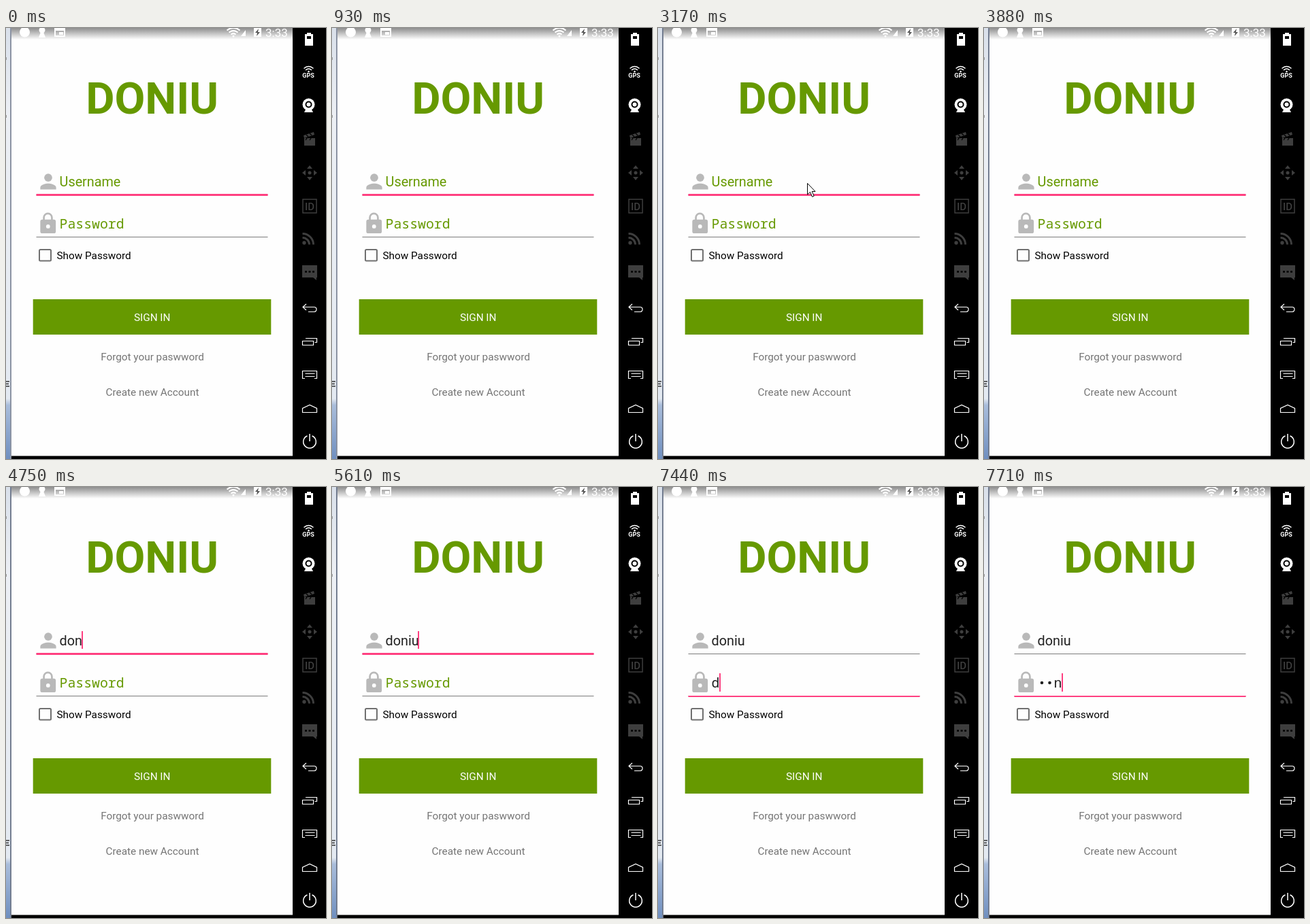
An HTML page for the animation above (7990 ms loop, 470x634 px).

```html
<!DOCTYPE html>
<html lang="en">
<head>
<meta charset="utf-8">
<title>Sign in</title>
<style>
  html, body { margin: 0; width: 100%; height: 100%; overflow: hidden; background: #fefefe; }
  svg { display: block; width: 470px; height: 634px; }
  text { font: 15.3px Roboto, sans-serif; white-space: pre; }
  .mid { text-anchor: middle; }
  .title { font-size: 65px; font-weight: 700; fill: #690; }
  .entry { font-size: 19.8px; fill: #212121; }
  .mono { font-family: "Noto Sans Mono", monospace; }
  .hint { fill: #690; }
  .soft { fill: #757575; }
  .pink { fill: #ff4081; }
  .line { fill: none; stroke: #fff; stroke-width: 1.2; }
  .dim { color: #3e3e3e; }
  .dim .line { stroke: currentColor; }

  /* every change is a hard cut on one shared clock */
  .a { animation: 7990ms step-end infinite; }
  .edge { animation-name: edge; }
  .name-hint { animation-name: name-hint; }
  .pass-hint { animation-name: pass-hint; }
  .name-focus { animation-name: name-focus; }
  .pass-focus { animation-name: pass-focus; }
  .n1 { animation-name: n1; }
  .n2 { animation-name: n2; }
  .n3 { animation-name: n3; }
  .n4 { animation-name: n4; }
  .n5 { animation-name: n5; }
  .p1 { animation-name: p1; }
  .p2 { animation-name: p2; }
  .p3 { animation-name: p3; }
  .dot1 { animation-name: dot1; }
  .name-caret { animation-name: name-blink, name-move; }
  .pass-caret { animation-name: pass-blink, pass-move; }
  .pointer { animation-name: pointer-show, pointer-move; }

  @keyframes edge { 0% { fill: #8b93a3 } 39.674%, 100% { fill: #737d90 } }
  @keyframes name-hint { 0% { visibility: visible } 54.067%, 100% { visibility: hidden } }
  @keyframes pass-hint { 0% { visibility: visible } 93.116%, 100% { visibility: hidden } }
  @keyframes name-focus { 0% { visibility: visible } 82.352%, 100% { visibility: hidden } }
  @keyframes pass-focus { 0% { visibility: hidden } 82.352%, 100% { visibility: visible } }

  @keyframes n1 { 0% { visibility: hidden } 54.067%, 100% { visibility: visible } }
  @keyframes n2 { 0% { visibility: hidden } 57.571%, 100% { visibility: visible } }
  @keyframes n3 { 0% { visibility: hidden } 59.449%, 100% { visibility: visible } }
  @keyframes n4 { 0% { visibility: hidden } 68.46%, 100% { visibility: visible } }
  @keyframes n5 { 0% { visibility: hidden } 70.212%, 100% { visibility: visible } }

  @keyframes p1 { 0%, 94.993%, 100% { visibility: hidden } 93.116% { visibility: visible } }
  @keyframes p2 { 0%, 96.495%, 100% { visibility: hidden } 94.993% { visibility: visible } }
  @keyframes p3 { 0% { visibility: hidden } 96.495%, 100% { visibility: visible } }
  @keyframes dot1 { 0% { visibility: hidden } 94.993%, 100% { visibility: visible } }

  @keyframes name-blink {
    0%, 11.639%, 24.405%, 35.919%, 48.56%, 66.833%, 77.221%, 100% { visibility: hidden }
    5.006%, 17.521%, 29.536%, 41.551%, 54.067%, 68.46% { visibility: visible }
  }
  @keyframes name-move {
    0% { transform: none }
    54.067% { transform: translateX(10px) }
    57.571% { transform: translateX(21px) }
    59.449% { transform: translateX(32px) }
    68.46% { transform: translateX(37px) }
    70.212%, 100% { transform: translateX(47px) }
  }
  @keyframes pass-blink {
    0%, 89.611% { visibility: hidden }
    82.352%, 93.116%, 100% { visibility: visible }
  }
  @keyframes pass-move {
    0% { transform: none }
    93.116% { transform: translateX(11px) }
    94.993% { transform: translateX(23px) }
    96.495%, 100% { transform: translateX(35px) }
  }
  @keyframes pointer-show {
    0%, 45.056%, 100% { visibility: hidden }
    31.289% { visibility: visible }
  }
  @keyframes pointer-move {
    0% { transform: translate(271px, 260px) }
    32.79% { transform: translate(243px, 248px) }
    34.418% { transform: translate(227px, 235px) }
    35.919%, 100% { transform: translate(219px, 228px) }
  }
</style>
</head>
<body>
<svg viewBox="0 0 470 634">
  <defs>
    <linearGradient id="bar" x2="0" y2="1">
      <stop offset="0" stop-color="#8e8e8e"/>
      <stop offset="1" stop-color="#fefefe"/>
    </linearGradient>
    <linearGradient id="desk" x2="0" y2="1">
      <stop offset="0" stop-color="#d9e0ea"/>
      <stop offset=".2" stop-color="#eceff4"/>
      <stop offset=".86" stop-color="#e3e9f1"/>
      <stop offset=".875" stop-color="#a9bddb"/>
      <stop offset="1" stop-color="#6f8fc0"/>
    </linearGradient>
  </defs>

  <!-- desktop strip and window -->
  <rect width="470" height="634" fill="#fefefe"/>
  <rect width="6" height="634" fill="url(#desk)"/>
  <rect class="a edge" x="6" width="2" height="634"/>
  <path d="M0 520h5M0 523.500h4M0 527h5" stroke="#333" stroke-width="1.500"/>
  <path d="M0 45h1M0 130h1" stroke="#999" stroke-width="4"/>
  <rect x="8" y="629.500" width="414" height="5"/>
  <rect x="421" width="49" height="634"/>

  <!-- status bar -->
  <rect x="8" width="413" height="17" fill="url(#bar)"/>
  <g fill="#fff">
    <circle cx="27.500" cy="6" r="7.500"/>
    <circle cx="53" cy="3" r="4.500"/>
    <path d="M51 6h4l3 8H48z"/>
    <path fill-rule="evenodd" d="M71 0h16v13H71zM73 4v7h12V4zM78 6h6v4h-6z"/>
    <path class="line" style="stroke-width:2.200" d="M324.500 3.500Q334-4 343.500 3.500M327.500 6.500Q334 1.500 340.500 6.500M330.500 9.500Q334 6.500 337.500 9.500"/>
    <circle cx="334" cy="12" r="1.500"/>
    <path d="M352 12V3l-7 9z"/>
    <path d="M364 0h11v13h-11z"/>
    <path d="M371 1l-5 6h3l-1 5 5-6h-3z" fill="#555"/>
    <text x="381" y="12.500" style="font-size:17px">3:33</text>
  </g>

  <!-- form -->
  <text class="title mid" x="214.600" y="126">DONIU</text>

  <g fill="#b9b9b9" transform="translate(1.850 7.700) scale(.97)">
    <circle cx="62" cy="219" r="6"/>
    <path d="M62 228c-4 0-12 2-12 6v3h24v-3c0-4-8-6-12-6z"/>
    <path fill-rule="evenodd" d="M70.500 282.500H69v-3a7.500 7.500 0 0 0-15 0v3h-1a3 3 0 0 0-3 3v15a3 3 0 0 0 3 3h17.500a3 3 0 0 0 3-3v-15a3 3 0 0 0-3-3zM56.800 282.500v-3a4.700 4.700 0 0 1 9.400 0v3z"/>
    <circle cx="61.800" cy="293" r="3" fill="#fefefe"/>
  </g>

  <rect x="44.500" y="245" width="340" height="1" fill="#7c7c7c"/>
  <rect class="a name-focus pink" x="44.500" y="244" width="340" height="3"/>
  <rect x="44.500" y="307" width="340" height="1" fill="#7c7c7c"/>
  <rect class="a pass-focus pink" x="44.500" y="307" width="340" height="2"/>

  <text class="a entry hint name-hint" x="78.600" y="233">Username</text>
  <text class="entry" x="78.600" y="233"><tspan class="a n1">d</tspan><tspan class="a n2">o</tspan><tspan class="a n3">n</tspan><tspan class="a n4">i</tspan><tspan class="a n5">u</tspan></text>
  <rect class="a name-caret pink" x="79" y="212" width="2" height="26"/>

  <text class="a entry mono hint pass-hint" x="78.600" y="295">Password</text>
  <text class="a entry mono p1" x="78.600" y="295">d</text>
  <text class="a entry mono p2" x="90.500" y="295">o</text>
  <text class="a entry mono p3" x="102.400" y="295">n</text>
  <circle class="a dot1" cx="85" cy="288" r="2.300" fill="#212121"/>
  <circle class="a p3" cx="96.500" cy="288" r="2.300" fill="#212121"/>
  <rect class="a pass-caret pink" x="79" y="274" width="2" height="27"/>

  <rect x="49" y="326" width="17" height="16.500" rx="1.500" fill="none" stroke="#707070" stroke-width="2"/>
  <text x="74.500" y="340">Show Password</text>

  <rect x="39.700" y="399" width="349.600" height="52" fill="#690"/>
  <text class="mid" x="214.700" y="431" fill="#fff">SIGN IN</text>
  <text class="mid soft" x="215" y="489">Forgot your paswword</text>
  <text class="mid soft" x="215" y="541">Create new Account</text>

  <!-- side toolbar -->
  <g fill="#fff">
    <path fill-rule="evenodd" d="M442 7h6v2h3v17h-12V9h3zM442 12v4h6v-4z"/>
    <path class="line" style="stroke-width:1.500" d="M437.500 59.500q7-6 14 0M440 62q4.500-4 9 0"/>
    <circle cx="444.500" cy="64" r="1.300"/>
    <text class="mid" x="444" y="73" style="font-size:9px;font-weight:700">GPS</text>
    <circle cx="444.500" cy="112.500" r="9"/>
    <circle cx="444.500" cy="112.500" r="5" fill="#000"/>
    <circle cx="444.500" cy="112.500" r="3"/>
    <path d="M440 120h9l2 4h-13z"/>
  </g>
  <g class="dim" fill="currentColor">
    <path d="M438 162h16v11h-16zM437 158l15-5 1 4-15 5z"/>
    <path d="M441 157l3 3M446 155l3 3M442 162l-2 3M448 162l-2 3" stroke="#000" stroke-width="1.300"/>
    <path d="M446 202l4 5h-8zM446 224l4-5h-8zM435 213l5-4v8zM457 213l-5-4v8z"/>
    <circle cx="446" cy="213" r="2.500"/>
    <rect class="line" style="stroke-width:1.500" x="436" y="252" width="20" height="20"/>
    <text class="mid" x="446" y="267.500" style="font-size:15px;font-weight:500">ID</text>
    <circle cx="438" cy="316" r="2.700"/>
    <path class="line" style="stroke-width:3" d="M435.500 308.500a10 10 0 0 1 10 10M435.500 302.500a16 16 0 0 1 16 16"/>
    <path d="M435 349h22v18h-1v4l-5-4h-16z"/>
    <path d="M439 358.500h3M444.500 358.500h3M450 358.500h3" stroke="#000" stroke-width="2.500"/>
  </g>
  <g class="line">
    <path d="M441 406l-5 4.500 5 4.500M436 410.500h16.500a3.500 3.500 0 0 1 0 7h-8.500"/>
    <path d="M435.500 460.500h16v6h-16zM440 456.500h16.500v6h-3"/>
    <path d="M439 515.500h-3.500v-11h21v11h-3.500M439.500 508.500h14M439.500 512.500h14"/>
    <path d="M435.500 565.500v-6l10.500-5 10.500 5v6z"/>
    <path stroke-width="1.500" d="M442.500 600a9.300 9.300 0 1 0 7 0M446 597v11"/>
  </g>

  <g class="a pointer">
    <path d="M.500.500v16.500l4-3.700 3 7 2.700-1.200-3-6.600h4.800z" fill="#fff" stroke="#000"/>
  </g>
</svg>
</body>
</html>
```
